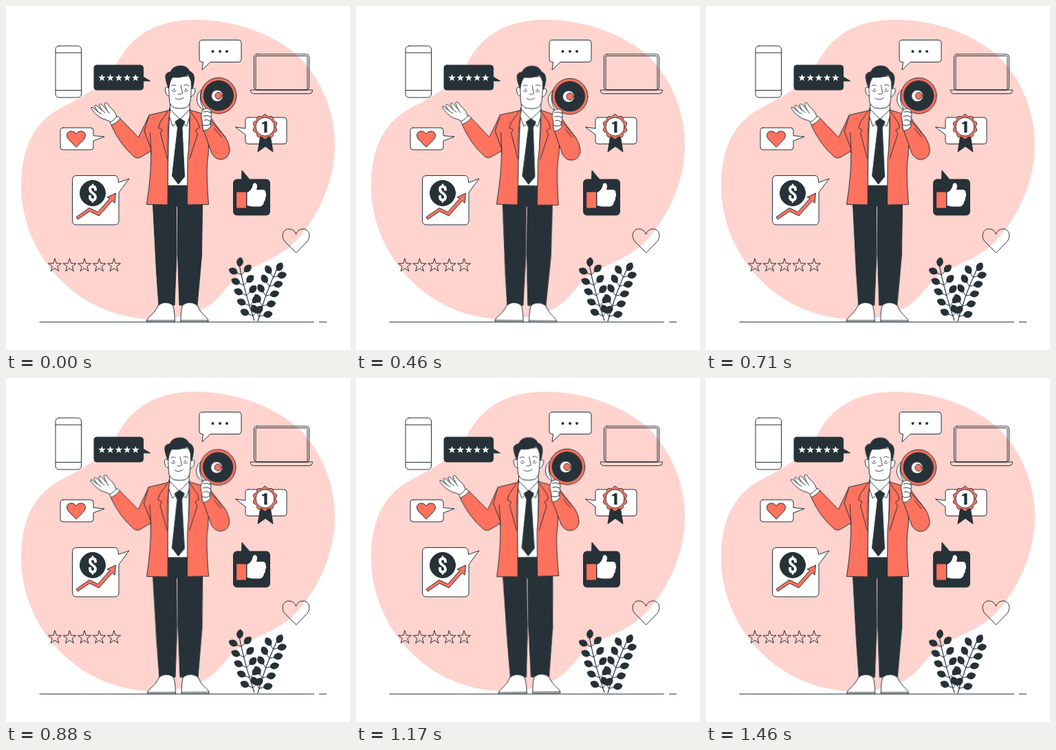
Animation, 500 px wide and 500 px high, one loop 1.5 s. Source, as an HTML page:

```html
<!DOCTYPE html>
<html lang="en">
<head>
<meta charset="utf-8">
<title>Presenter with megaphone</title>
<style>
  html, body { margin: 0; width: 100%; height: 100%; overflow: hidden; background: #fff; }
  svg { display: block; width: 100vw; height: 100vh; }
  .l { fill: none; }
  .w { fill: #fff; }
  .c { fill: #ff725e; }
  .d { fill: #263238; }
  .n { stroke: none; }
  #man { transform-origin: 229px 273px; }
</style>
</head>
<body>
<svg viewBox="0 0 500 500" stroke="#263238" stroke-linejoin="round" stroke-linecap="round">
  <path class="n" fill="#ffd3ce" d="M275 20C335 20 390 42 425 73C460 108 478 155 478 203C478 255 452 310 419 344C388 373 356 376 332 397C308 420 300 455 210 455C100 452 22 358 22 262C22 200 45 166 82 147C115 130 142 115 160 86C183 40 222 20 275 20Z"/>

  <g id="phone">
    <rect class="w" x="72" y="58" width="37.5" height="75" rx="5"/>
    <path class="l" d="M72 68H109.500M72 122.500H109.500"/>
  </g>

  <g id="laptop" class="l">
    <rect x="360.500" y="70" width="80" height="52" rx="4"/>
    <rect x="363" y="72.500" width="75" height="49.500" rx="1.500"/>
    <path d="M355.500 122H445.500V123.500Q445 127.500 440.500 127.500H360.500Q356 127.500 355.500 123.500Z"/>
  </g>

  <g id="chat">
    <path class="w" d="M285 49.500H338Q342 49.500 342 53.500V77.500Q342 81.500 338 81.500H297L285 93L286.500 81.500H285Q281 81.500 281 77.500V53.500Q281 49.500 285 49.500Z"/>
    <path stroke-width="4" d="M300.500 66h.01M311 66h.01M321 66h.01"/>
  </g>

  <g id="rating">
    <path class="d" d="M132 86H195.500Q199.500 86 199.500 90V103L209.500 109H199.500V118Q199.500 122 195.500 122H132Q128 122 128 118V90Q128 86 132 86Z"/>
  </g>

  <g id="love">
    <path class="w" d="M83 177H123Q127 177 127 181V188.500L143 190L127 196V205Q127 209 123 209H83Q79 209 79 205V181Q79 177 83 177Z"/>
    <path class="c" d="M102 205L91 194C86 188 89 182 95 182Q100 182 102 186Q104 182 109 182C115 182 118 188 113 194Z"/>
  </g>

  <g id="growth">
    <path class="w" d="M102.500 246.500H158Q162 246.500 163 251.500L163.500 256.500L179 251L164 271V312Q164 318 158 318H102.500Q96.500 318 96.500 312V252.500Q96.500 246.500 102.500 246.500Z"/>
    <circle class="d" cx="126" cy="272" r="18.500"/>
    <path class="l" stroke="#fff" stroke-width="3.800" stroke-linecap="butt" d="M130 268.500V266.500Q130 262.500 126 262.500Q122 262.500 122 266.500C122 272 130 272 130 277.500Q130 282 126 282Q122 282 122 277.500V275"/>
    <path class="l" stroke="#fff" stroke-width="2.400" stroke-linecap="butt" d="M126 258.500V262M126 282V286"/>
    <path class="c" d="M102.500 306.500L121 293.500L133.500 299.500L151 279.500L147 278L159.500 272L158 286.500L154.500 283L135 305L121.500 298.500L104.500 310Z"/>
  </g>

  <g id="award">
    <path class="w" d="M352 162H404Q408 162 408 166V196.500Q408 200.500 404 200.500H352Q348 200.500 348 196.500V187L333.500 176L348 178V166Q348 162 352 162Z"/>
    <path class="d" d="M370 187L366 212L377 204L388 212L384 187Z"/>
    <path id="seal" class="c"/>
    <circle class="w" cx="376.500" cy="175.500" r="13.500"/>
    <path class="d n" d="M376 167.500H379.500V184H375.300V171.500H372V169.500Q375 169.500 376 167.500Z"/>
  </g>

  <g id="like">
    <path class="d" d="M336 252H342.500L343 239L354 252H378Q383.500 252 383.500 258V298Q383.500 304 378 304H336Q330.500 304 330.500 298V258Q330.500 252 336 252Z"/>
    <rect class="c" x="335" y="270" width="14.500" height="24"/>
    <path class="w n" d="M350.500 271C355 269 358 265 359 259Q361 256 364 258.500Q366 261 364 267H374Q378 268 377.500 272Q379 275 377 278.500Q377.500 282 375 284.500Q374.500 290.500 369 291.500H357L350.500 290Z"/>
  </g>

  <path class="l" d="M421.500 358.500L405 342C399 334 403 324 411 324Q419 324 421.500 332Q424 324 432 324C440 324 444 334 438 342Z"/>
  <g id="stars"></g>
  <path class="l" stroke-linecap="butt" d="M48.500 459.300H448M455 459.300H466"/>
  <g id="plants" class="d">
    <path class="l" stroke-width="1.200" d="M361 457Q347 417 339 376M366 458Q378 415 394 382"/>
  </g>

  <g id="man">
    <g id="legs">
      <path class="d" d="M232 261H266L285.500 288L284.500 362L278 435H252L249.500 360V291H247.500L248 360L245 435H222L218.500 385L213.500 288Z"/>
      <path class="w" d="M221.500 435Q231 427.500 241.500 434Q245 438 245.500 459H204.500Q204 455 208 452Q217 445 221.500 435Z"/>
      <path class="w" d="M278 435Q268 427.500 257.500 434Q254 438 254 459H294Q294.500 455 290.500 452Q282 445 278 435Z"/>
      <path class="l" d="M204.500 457H245.500M254 457H294"/>
    </g>

    <g id="open-hand">
      <path class="w" d="M153 169C147 165 141 165 137 162Q130 158 124 149.500Q123 146.500 126 147.500L134 154Q130 149 128.500 145.500Q129.500 143 132 145L140 152Q136 147 135.500 143.500Q137 141 139.500 143.500L147 151.500Q144 146 143 142Q144 139.500 146.500 141Q150 147 154.500 150Q159 154 161 161Z"/>
      <path class="l" d="M134 154L139 157M140 152L144 155M147 151.500L150 156"/>
      <path class="w" d="M151.500 169Q157 166 162 160L167 164.500L155 175Z"/>
    </g>
    <path class="c" d="M208 158.500Q203 170 192.500 191L166 163.500Q161 170 153 173.500Q166 202 186 219Q191 223 197 219L212 210L220 170Z"/>

    <g id="shirt">
      <path class="w" d="M238 148H267L264.500 261H235Z"/>
      <path class="w" d="M238.500 132V153L252.500 166L267 153V132Z"/>
      <path class="w" d="M239 151L236.500 158L242.500 175L252.500 165ZM267 151L268 158L262.500 175L253 165Z"/>
      <path class="d" d="M246 168L252.800 163.500L260 168L256 177L259.500 248L250.500 259L241.500 247L249.500 177Z"/>
    </g>

    <g id="jacket">
      <path class="c" d="M238.500 151L230 153.500L208 158.500L201 182L210.500 207Q212 240 204.500 288.500L235 289L235.500 220Q233 185 238.500 151Z"/>
      <path class="c" d="M267 151L277 154L296 160L294 217Q290 235 294.500 288.500L263.500 289L264 222Q268 190 267 151Z"/>
      <path class="l" d="M235.500 153L224.500 168.500L221.500 177L227 180L224.500 185L234.500 222M268 153L279.500 170L281 177L275.500 180.500L278.500 186L267 222M209.500 184L211 214"/>
    </g>

    <g id="megaphone">
      <path class="w" d="M292 120C283 119 277 128 277.500 137Q279 148 289 151L298 145Z"/>
      <path class="l" d="M284 122Q279 136 287 149"/>
      <circle class="c" cx="309" cy="130.300" r="26"/>
      <circle class="d" cx="309" cy="130.300" r="21.700"/>
      <circle class="w" cx="307" cy="130.500" r="8.500"/>
      <circle class="c" cx="309" cy="130.500" r="5"/>
    </g>

    <g id="raised-arm">
      <path class="c" d="M296 160Q299 164 302 169L319 191Q326 203 325 212Q322 223 312 223Q304 223 299 214L287 180L297 176Z"/>
      <path class="l" d="M298 167L319 191M303 178L313 190"/>
      <path class="w" d="M286 151Q290 148 294 149Q299 151 298 155Q300 158 298 161Q299 165 297 169L296 176H286L285 166Q282 158 286 151Z"/>
      <path class="l" d="M287 154Q293 152 298 155M287 160Q293 158 298 161M288 166Q293 164 297 168"/>
      <path class="w" d="M285.500 172.500Q291 175.500 297.500 171.500L298 175Q293 181 287 181.500Z"/>
    </g>

    <g id="head">
      <path class="w" d="M237 119Q231 116 231.500 122Q232 131 238 131M268 121Q274 117 275 122Q275 130 268 132"/>
      <path class="w" d="M237 104Q236 122 237.500 139Q239 145 245 148Q253 150 261 148Q267 145 268 138Q270 122 269 102Z"/>
      <path class="d" d="M236.500 120Q231 107 232 100.500Q234 96 239 96Q242 88 252 87Q263 86 267 95Q274 97 273.500 107Q273 114 270.500 121L269.500 110L265 99.500Q255 105 242 103.500Q238 109 236.500 120Z"/>
      <path class="l" stroke-width=".9" d="M240.500 116Q243 113.500 247 115.500M259 115Q263 113 266 116M241 122.500Q244 126 247 123M259 123Q262 126 265 122.500M254 115L256.500 127Q254 129 250 128M246 134Q251 138 258 133.500"/>
      <path stroke-width="2" d="M244.500 121h.01M261.500 121h.01"/>
    </g>
  </g>
</svg>

<script>
const $ = id => document.getElementById(id);

function add(parent, cls, d) {
  const p = document.createElementNS('http://www.w3.org/2000/svg', 'path');
  p.setAttribute('class', cls);
  p.setAttribute('d', d);
  $(parent).append(p);
  return p;
}

// Closed outline with radius r(i) at each of n evenly spaced directions.
function ring(cx, cy, n, r) {
  const pts = Array.from({ length: n }, (_, i) => {
    const a = i / n * 2 * Math.PI - Math.PI / 2;
    return (cx + r(i) * Math.cos(a)).toFixed(2) + ' ' + (cy + r(i) * Math.sin(a)).toFixed(2);
  });
  return 'M' + pts.join('L') + 'Z';
}

const star = (x, y, r) => ring(x, y, 10, i => i % 2 ? r * 0.4 : r);

for (let i = 0; i < 5; i++) {
  add('rating', 'w n', star(139.5 + i * 12.2, 104.5, 5.6));
  add('stars', 'l', star(71 + i * 21.5, 377.3, 10));
}
$('seal').setAttribute('d', ring(376.5, 175.5, 120, i => 16.8 + 1.2 * Math.cos(i / 120 * 20 * Math.PI)));

function leaf(x, y, angle) {
  add('plants', 'n', 'M0 0C6.5 -3 6.500 -11 0 -14C-6.500 -11 -6.500 -3 0 0Z')
    .setAttribute('transform', `translate(${x} ${y}) rotate(${angle})`);
}

// Leaf pairs along a stem given by its quadratic curve.
function sprig(p, tilt) {
  const at = (k, t) => (1 - t) ** 2 * p[k] + 2 * t * (1 - t) * p[k + 2] + t * t * p[k + 4];
  leaf(p[4], p[5] + 3, tilt < 0 ? 8 : tilt + 10);
  for (let i = 0; i < 5; i++) {
    const t = 0.08 + i * 0.185, x = at(0, t), y = at(1, t);
    for (const side of [-1, 1]) {
      const a = tilt + side * 55, r = a * Math.PI / 180;
      const bx = x + 6 * Math.sin(r), by = y - 6 * Math.cos(r);
      add('plants', 'l', `M${x} ${y}L${bx} ${by}`);
      leaf(bx, by, a);
    }
  }
}
sprig([361, 457, 347, 417, 339, 376], -10);
sprig([366, 458, 378, 415, 394, 382], 22);

$('man').animate([
  { offset: 0, transform: 'rotate(0deg)' },
  { offset: 0.25, transform: 'rotate(1deg)' },
  { offset: 0.75, transform: 'rotate(-1deg)' },
  { offset: 1, transform: 'rotate(0deg)' }
], { duration: 1500, iterations: Infinity });
</script>
</body>
</html>
```
